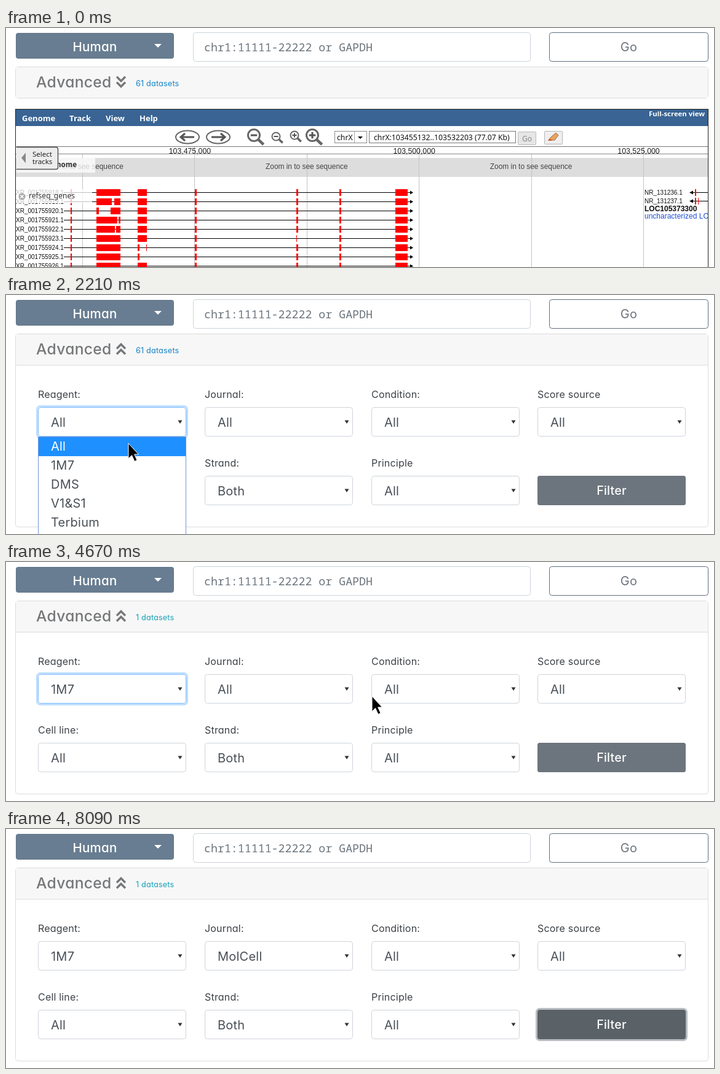
Write an HTML page that moves like this. It is 1151 px wide and 390 px high and loops after 8.72 s.

```html
<!DOCTYPE html>
<html lang="en">
<head>
<meta charset="utf-8">
<title>Dataset filter</title>
<style>
html, body { margin: 0; width: 100%; height: 100%; overflow: hidden; background: #fff; }
#stage { display: block; width: 100%; height: 100%; }
text { white-space: pre; }
.ui { font-family: Inter, sans-serif; font-feature-settings: "cv11"; letter-spacing: .012em; }
.mono { font-family: "Noto Sans Mono", monospace; }
.menu { font-family: "Noto Sans", sans-serif; }
.map { font-family: "Liberation Sans", Arial, sans-serif; }
</style>
</head>
<body>
<svg id="stage" viewBox="0 0 1151 390">
  <g id="head"></g>
  <svg id="browser" width="1142" height="390"></svg>
  <g id="panel"></g>
  <g id="cursor"></g>
</svg>
<script>
const LOOP = 8720, STEP = 76.9;
const $ = id => document.getElementById(id);

// Markup helpers
const box = (x, y, w, h, fill, more = '') =>
  `<rect x="${x}" y="${y}" width="${w}" height="${h}" fill="${fill}" ${more}/>`;
const frame = (x, y, w, h, stroke, fill = '#fff', r = 4) =>
  box(x + .5, y + .5, w - 1, h - 1, fill, `stroke="${stroke}" rx="${r}"`);
const path = (d, fill, stroke = 'none', width = 1, more = '') =>
  `<path d="${d}" fill="${fill}" stroke="${stroke}" stroke-width="${width}" ${more}/>`;
const text = (font, str, x, y, size, fill, weight = 400, anchor = 'start') =>
  `<text class="${font}" x="${x}" y="${y}" font-size="${size}" fill="${fill}" font-weight="${weight}" text-anchor="${anchor}">${str.replace('&', '&amp;')}</text>`;

function header() {
  return frame(16, 8, 257, 42, '#62778c', '#687d91', 3) +
    text('ui', 'Human', 144.5, 38, 20.5, '#fff', 500, 'middle') +
    path('M241 26h12l-6 6z', '#fff') +
    frame(304, 7, 549, 48, '#ced4da') +
    text('mono', 'chr1:11111-22222 or GAPDH', 322, 38, 18.28, '#6c757d') +
    frame(883, 7, 259, 48, '#5f6f7e') +
    text('ui', 'Go', 1012.5, 38, 20, '#6c757d', 400, 'middle');
}

function lens(x, y, r, plus) {
  const w = r > 7 ? 3 : 2, k = r * .7, a = r * .55;
  return path(`M${x + k} ${y + k}l${r * .95} ${r * .9}`, 'none', '#666', w + 1.6) +
    `<circle cx="${x}" cy="${y}" r="${r}" fill="#fff" stroke="#666" stroke-width="${w}"/>` +
    path(`M${x - a} ${y}h${2 * a}` + (plus ? `M${x} ${y - a}v${2 * a}` : ''), 'none', '#555', w);
}

function ovalArrow(x, dir) {
  return `<ellipse cx="${x}" cy="178" rx="19" ry="10.5" fill="#fff" stroke="#666" stroke-width="2"/>` +
    path(`M${x - 11 * dir} 178h${21 * dir}M${x + 4 * dir} 172l${7 * dir} 6l${-7 * dir} 6`, 'none', '#555', 3);
}

function toolbar() {
  const menu = [['Genome', 26], ['Track', 103], ['View', 162], ['Help', 217]];
  return box(15, 132, 1127, 300, '#222') + box(16, 133, 1125, 300, '#fff') +
    box(16, 133, 1125, 27, '#396494') +
    menu.map(([s, x]) => text('menu', s, x, 152, 13, '#fff', 600)).join('') +
    text('menu', 'Full-screen view', 1136, 144, 11.4, '#fff', 600, 'end') +
    ovalArrow(295, -1) + ovalArrow(345, 1) +
    lens(403, 175, 9.5) + lens(439, 177, 6.5) + lens(469, 175, 6.5, true) + lens(498, 175, 9.5, true) +
    frame(534, 168, 53, 20, '#8a8a8a', '#fff', 0) + text('menu', 'chrX', 538, 183, 12.2, '#111') +
    box(566, 169, 1, 18, '#aaa') + path('M572 177h8l-4 4z', '#000') +
    frame(590, 168, 239, 20, '#777', '#fff', 0) +
    text('menu', 'chrX:103455132..103532203 (77.07 Kb)', 598, 183, 12.2, '#111') +
    frame(832, 169, 30, 22, '#bbb', '#e6e6e6', 1) + text('menu', 'Go', 847, 185, 12.2, '#888', 400, 'middle') +
    frame(875, 168, 30, 22, '#b5b5b5', '#efefef', 1) +
    path('M882 183l4-5 8-7 4 4-6 8z', '#e9a35c', '#9a7048') + path('M881 184l3-4 4 4z', '#d65a32');
}

function genes() {
  const firstExon = { 1: [[147, 172], [176, 186]], 2: [[147, 151], [170, 186]], 3: [[147, 181], [183, 186]], 4: [[147, 177], [179, 186]] };
  const secondExon = { 6: [[214, 217], [228, 229]], 7: [[214, 217]] };
  let out = '';
  for (let i = 0; i < 9; i++) {
    const y = 268 + 15 * i;
    const exons = [[105, 107], ...(firstExon[i] || [[147, 186]]), ...(secondExon[i] || [[214, 229]]),
      [307, 310], [472, i === 5 ? 473 : 475], [542, 545], [633, 653]];
    out += text('map', `XR_${'001755' + (918 + i)}.1`, 16, y + 4, 10, '#111') +
      box(94, y, 564, 1, '#000') + path(`M657 ${y - 2.5}l5 3-5 3z`, '#000') +
      exons.map(([a, b]) => box(a, y - 5, b - a, 11, '#f00')).join('');
  }
  return out;
}

function browser() {
  let out = toolbar() + box(16, 193, 1125, 1, '#777') + box(16, 205, 1125, 1, '#888') +
    box(16, 212, 1125, 31, '#dedddd');
  for (let i = 0; i < 6; i++) {
    const x = 124 + 182.4 * i;
    out += box(Math.round(x), 206, 1, 190, '#c4c4c4');
    out += i % 2
      ? box(Math.round(x), 194, 1, 12, '#bbb') + text('map', `103,${475 + 12.5 * (i - 1)},000`, x - 7.5, 205, 12.3, '#222', 400, 'middle')
      : text('map', 'Zoom in to see sequence', x, 230, 11.9, '#444', 400, 'middle');
  }
  out += genes();
  // Pinned track labels and the selector tab
  out += box(17, 212, 128, 24, '#fff', 'opacity=".75"') + text('menu', 'Genome', 115, 227, 11.6, '#333', 600, 'end') +
    box(17, 263, 123, 23, '#fff', 'opacity=".75"') +
    '<circle cx="26" cy="275" r="5.5" fill="#aaa"/>' + path('M23.5 272.5l5 5m0-5l-5 5', 'none', '#fff', 1.6) +
    text('menu', 'refseq_genes', 37, 278, 12, '#333') +
    path('M17 194.5H81q3.500 0 3.500 3.500V227q0 3.500-3.500 3.500H17', '#ededed', '#555', 1.5) +
    path('M32 203.500v17l-7-8.500z', '#888') +
    text('menu', 'Select', 43, 210, 11.5, '#222') + text('menu', 'tracks', 43, 222, 11.5, '#222');
  // Right-hand gene
  [268, 282].forEach((y, i) => {
    out += text('map', `NR_13123${6 + i}.1`, 1038, y + 4, 10, '#111') + box(1114, y, 27, 1, '#000') +
      path(`M1117 ${y - 2.5}l-6 3 6 3z`, '#000') + box(1120, y - 5, 2, 11, '#f00');
  });
  return out + box(1125, 277, 1, 11, '#f00') +
    text('map', 'LOC105373300', 1038, 299, 12, '#111', 700) +
    text('map', 'uncharacterized LOC105373300', 1038, 311, 12, '#1f4fd8') +
    box(1141, 132, 1, 260, '#222');
}

function select(x, y, value, focused) {
  return (focused ? box(x - 1.5, y - 1.5, 244, 51, 'none', 'rx="5" stroke="#bfdeff" stroke-width="3"') : '') +
    frame(x, y, 241, 48, focused ? '#80bdff' : '#ced4da') +
    text('ui', value, x + 21, y + 32, 20, '#495057') +
    path(`M${x + 227.5} ${y + 21.5}h7l-3.500 5.500z`, '#333');
}

function dropdown(x, items, active) {
  const h = items.length * 31 + 2;
  return frame(x, 231, 241, h, '#7396d6', '#fff', 0) + items.map((s, i) =>
    (i === active ? box(x + 1, 232 + 31 * i, 239, 31, '#1e90ff') : '') +
    text('ui', s, x + 21, 254 + 31 * i, 20, i === active ? '#fff' : '#495057')).join('');
}

const COLS = [52, 323, 594, 864];
const REAGENTS = ['All', '1M7', 'DMS', 'V1&S1', 'Terbium', 'Other'];
const JOURNALS = ['All', 'MolCell'];
const within = (t, a, b) => t >= a && t < b;

// CSS "ease": cubic-bezier(.25, .1, .25, 1)
function ease(p) {
  if (p <= 0) return 0;
  if (p >= 1) return 1;
  const bez = (a, b, s) => 3 * a * s * (1 - s) ** 2 + 3 * b * s * s * (1 - s) + s ** 3;
  let lo = 0, hi = 1;
  for (let i = 0; i < 20; i++) {
    const mid = (lo + hi) / 2;
    if (bez(.25, .25, mid) < p) lo = mid; else hi = mid;
  }
  return bez(.1, 1, lo);
}

function panel(t, open, pos) {
  const bottom = 115 + open;
  const link = within(t, 835, 1745), single = t >= 4375;
  const up = t >= 1055;
  const chevron = y => `M180 ${y}l7 ${up ? -7 : 7} 7 ${up ? 7 : -7}`;
  let out = frame(15, 63, 1127, bottom - 63, '#dcdcdc') + box(16, 64, 1125, 50, '#f7f7f7');
  if (open) out += box(16, 114, 1125, 1, '#dcdcdc');
  out += text('ui', 'Advanced', 49, 97, 24.6, '#757779', 500) +
    path(up ? chevron(87.500) + chevron(96.500) : chevron(79.500) + chevron(88.500), 'none', '#757779', 3.4) +
    text('ui', `${single ? 1 : 61} datasets`, 211, 95, 12.7, single ? '#17a2b8' : '#1784c7');
  if (link) out += box(49, 99, 130, 2, '#0b5cb5');
  if (!open) return out;

  const labels = ['Reagent:', 'Journal:', 'Condition:', 'Score source', 'Cell line:', 'Strand:', 'Principle'];
  const values = [t >= 4055 ? '1M7' : 'All', t >= 5525 ? 'MolCell' : 'All', 'All', 'All', 'All', 'Both', 'All'];
  const focus = within(t, 2130, 4975) ? 0 : within(t, 4975, 6535) ? 1 : -1;
  let body = labels.map((s, i) => {
    const x = COLS[i % 4], y = i < 4 ? 183 : 295;
    return text('ui', s, x, y - 15, 16, '#3c4146') + select(x, y, values[i], i === focus);
  }).join('');
  const hot = t >= 6215;
  if (t >= 6535) body += box(862.5, 293.5, 244, 51, 'none', 'rx="5" stroke="#b9bdc2" stroke-width="3"');
  body += box(864, 295, 241, 48, hot ? '#5a6268' : '#6c757d', 'rx="3.500"') +
    text('ui', 'Filter', 984.5, 326, 19.6, '#fff', 500, 'middle');
  out += `<svg width="1151" height="${bottom - 1}">${body}</svg>`;

  const row = Math.max(0, Math.floor((pos.y - 232) / 31));
  if (within(t, 2130, 4055)) out += dropdown(COLS[0], REAGENTS, row);
  if (within(t, 5050, 5525)) out += dropdown(COLS[1], JOURNALS, Math.min(row, 1));
  return out;
}

// Pointer path: time, x, y of the tip
const TRACK = [
  [140, 944, 228], [370, 640, 186], [600, 330, 128], [760, 200, 98], [910, 158, 82],
  [1290, 158, 82], [1600, 165, 100], [1750, 172, 110], [1980, 196, 190], [2130, 198, 214],
  [2210, 199, 242], [2520, 190, 266], [2900, 190, 266], [3290, 171, 331], [3370, 171, 331],
  [3670, 168, 304], [3900, 170, 280], [4060, 172, 276], [4290, 339, 246], [4380, 430, 232],
  [4670, 599, 219], [4980, 440, 212], [5060, 436, 224], [5220, 438, 266], [5530, 450, 275],
  [5760, 560, 276], [6070, 818, 274], [6140, 886, 284], [6220, 908, 302], [6620, 931, 316],
  [6700, 931, 316], [6920, 896, 316], [7630, 896, 316], [7860, 960, 338], [8080, 1088, 389]
];

function pointer(t) {
  let i = TRACK.findIndex(k => k[0] > t);
  if (i < 0) i = TRACK.length - 1;
  if (i === 0) i = 1;
  const [a, b] = [TRACK[i - 1], TRACK[i]];
  const p = Math.min(1, Math.max(0, (t - a[0]) / (b[0] - a[0])));
  return { x: Math.round(a[1] + (b[1] - a[1]) * p), y: Math.round(a[2] + (b[2] - a[2]) * p) };
}

const ARROW = path('M0 0V25L5.500 19.500 10 29.500 14 27.500 9.700 18H16.500Z', '#000', '#fff', 1);
const HAND = path('M-1.500 1.500Q.5-.8 2.500 1.500V10Q4.500 8 6.500 10.500 8.500 9 10.300 11.500 13.500 10.500 14 14V21L11 26V30.500H0V26.500L-5.500 18Q-7 14.500-4.500 14.200L-1.500 17Z', '#fff', '#000', 1.3) +
  path('M2.500 10v5M6.500 10.500v5M10.300 11.500v4', 'none', '#000', 1.1);

const last = {};
function put(id, markup) {
  if (last[id] !== markup) $(id).innerHTML = last[id] = markup;
}

function draw(t) {
  const held = 140 + Math.floor((t - 130) / STEP) * STEP;
  const open = Math.round(264 * ease((held - 1049) / 350));
  const pos = pointer(held);
  $('browser').setAttribute('y', open);
  put('panel', panel(t, open, pos));
  const hand = within(t, 835, 1745) || (t >= 6215 && pos.y >= 295 && pos.y < 343);
  put('cursor', within(t, 140, 8085) ? (hand ? HAND : ARROW) : '');
  $('cursor').setAttribute('transform', `translate(${pos.x} ${pos.y})`);
}

put('head', header());
put('browser', browser());
const start = performance.now();
function tick() {
  draw((performance.now() - start) % LOOP);
  requestAnimationFrame(tick);
}
tick();
</script>
</body>
</html>
```
